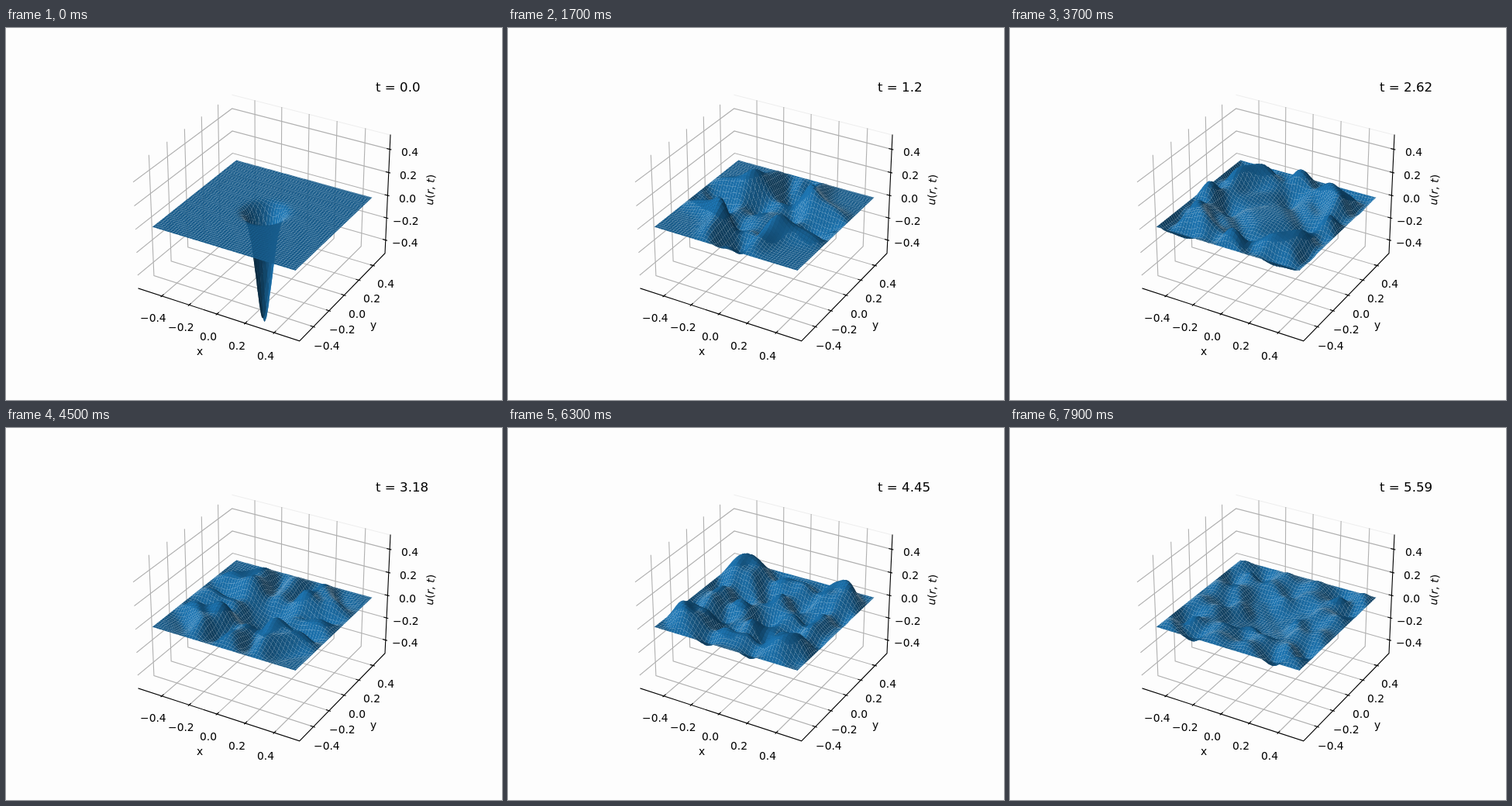
An HTML page with a canvas for the animation above (8000 ms loop, 640x480 px).

```html
<!DOCTYPE html>
<html lang="en">
<head>
<meta charset="utf-8">
<title>Wave on a square membrane</title>
<style>
html, body { margin: 0; width: 640px; height: 480px; overflow: hidden; background: #fdfdfd; }
svg, canvas { position: absolute; left: 0; top: 0; display: block; }
text { font-family: "DejaVu Sans", sans-serif; font-size: 13.89px; fill: #000; }
.mid { text-anchor: middle; }
.grid { fill: none; stroke: #b0b0b0; stroke-width: 1.11; stroke-linecap: square; }
.axis { fill: none; stroke: #000; stroke-width: 1.11; stroke-linecap: square; }
.pane { fill: none; stroke: #eee; stroke-width: 1; }
</style>
</head>
<body>
<svg id="axes" width="640" height="480" viewBox="0 0 640 480">
  <g id="frame"></g>
  <text class="mid" x="250" y="422">x</text>
  <text class="mid" x="474" y="388">y</text>
  <text class="mid" transform="translate(552 209) rotate(-87.4)"><tspan font-style="oblique">u</tspan>(<tspan font-style="oblique">r</tspan>, <tspan font-style="oblique">t</tspan>)</text>
  <text id="clock" x="477" y="82" style="font-size:16.67px"></text>
</svg>
<canvas id="surface" width="640" height="480"></canvas>
<script>
const start = performance.now();
const FRAMES = 80, FRAME_MS = 100, STEPS = 10;
const N = 100, STRIDE = 2, DX = 1 / (N - 1), COURANT = 0.7, DT = COURANT * DX;

// Perspective camera: elevation 30°, azimuth -60°, distance 10
const SX = 8 / 7 / 1.1, SZ = 6 / 7;
const C = Math.sqrt(3) / 2;
function project(x, y, z) {
  const depth = 10 - (C / 2 * x - 0.75 * y + 0.5 * z);
  const k = 369.6 / 0.185 / depth;
  return [333 + k * (C * x + 0.5 * y), 237.4 - k * (-0.25 * x + C / 2 * y + C * z), depth];
}

// Axes box
const M = 25 / 42, MZ = 25 / 56, PAD = 0.0988, OUT = 0.0095, IN = 0.019;
const frame = document.getElementById("frame");
function add(tag, attrs, content = "") {
  const el = document.createElementNS("http://www.w3.org/2000/svg", tag);
  for (const key in attrs) el.setAttribute(key, attrs[key]);
  el.textContent = content;
  frame.append(el);
  return el;
}
function line(cls, ...points) {
  const coords = points.map(p => project(...p).slice(0, 2).map(v => v.toFixed(2)).join());
  add("polyline", { class: cls, points: coords.join(" ") });
}
// Labels are centred, then set on whole pixels
function label(value, pos, dy) {
  const [x, y] = project(...pos);
  const el = add("text", { y: Math.round(y + dy) }, value.toFixed(1).replace("-", "\u2212"));
  el.setAttribute("x", Math.floor(x - el.getComputedTextLength() / 2));
}
function drawAxes() {
  const ticks = [-0.4, -0.2, 0, 0.2, 0.4];
  line("pane", [-M, M, MZ], [M, M, MZ]);
  for (const t of ticks) {
    const s = t * SX, h = t * SZ;
    line("grid", [s, -M, -MZ], [s, M, -MZ], [s, M, MZ]);
    line("grid", [M, s, -MZ], [-M, s, -MZ], [-M, s, MZ]);
    line("grid", [-M, -M, h], [-M, M, h], [M, M, h]);
  }
  line("axis", [-M, -M, -MZ], [M, -M, -MZ], [M, M, -MZ], [M, M, MZ]);
  for (const t of ticks) {
    const s = t * SX, h = t * SZ;
    line("axis", [s, -M - OUT, -MZ], [s, -M + IN, -MZ]);
    line("axis", [M + OUT, s, -MZ], [M - IN, s, -MZ]);
    line("axis", [M + OUT, M, h], [M - IN, M, h]);
    label(t, [s, -M - PAD, -MZ - PAD], 7.3);
    label(t, [M + PAD, s, -MZ - PAD], 7.3);
    label(t, [M + PAD, M + PAD, h], 12);
  }
}

// Wave equation with fixed edges, released from rest as a Gaussian dip
const coord = i => -0.5 + i * DX;
function simulate() {
  let now = new Float64Array(N * N), next = new Float64Array(N * N), prev;
  const inner = visit => {
    for (let j = 1; j < N - 1; j++)
      for (let i = 1; i < N - 1; i++) visit(j * N + i, i, j);
  };
  const bend = (u, k) => COURANT ** 2 * (u[k - 1] + u[k + 1] + u[k - N] + u[k + N] - 4 * u[k]);
  inner((k, i, j) => { now[k] = -Math.exp(-200 * (coord(i) ** 2 + coord(j) ** 2)); });
  prev = now.slice();
  inner(k => { prev[k] = now[k] + 0.5 * bend(now, k); });
  const shots = [now.slice()];
  while (shots.length < FRAMES) {
    for (let s = 0; s < STEPS; s++) {
      inner(k => { next[k] = 2 * now[k] - prev[k] + bend(now, k); });
      [prev, now, next] = [now, next, prev];
    }
    shots.push(now.slice());
  }
  return shots;
}

// Each patch is the outline of a block of grid cells
function makePatches() {
  const cuts = [];
  for (let i = 0; i < N - 1; i += STRIDE) cuts.push(i);
  cuts.push(N - 1);
  const patches = [];
  for (let b = 0; b + 1 < cuts.length; b++)
    for (let a = 0; a + 1 < cuts.length; a++) {
      const [x0, x1, y0, y1] = [cuts[a], cuts[a + 1], cuts[b], cuts[b + 1]];
      const ring = [];
      for (let i = x0; i < x1; i++) ring.push(y0 * N + i);
      for (let j = y0; j < y1; j++) ring.push(j * N + x1);
      for (let i = x1; i > x0; i--) ring.push(y1 * N + i);
      for (let j = y1; j > y0; j--) ring.push(j * N + x0);
      patches.push(ring);
    }
  return patches;
}

function shade(ring, u) {
  const n = ring.length;
  const [p, q, r] = [0, Math.floor(n / 3), Math.floor(2 * n / 3)].map(i => {
    const k = ring[i];
    return [coord(k % N), coord(Math.floor(k / N)), u[k]];
  });
  const a = p.map((v, i) => v - q[i]), b = q.map((v, i) => v - r[i]);
  const nx = a[1] * b[2] - a[2] * b[1];
  const ny = a[2] * b[0] - a[0] * b[2];
  const nz = a[0] * b[1] - a[1] * b[0];
  const lit = (-2 * nx - 2 * ny + nz) / 3 / Math.hypot(nx, ny, nz);
  const level = 0.65 + 0.35 * lit;
  return `rgb(${[31, 119, 180].map(c => Math.round(c * level)).join()})`;
}

const shots = simulate(), patches = makePatches();
const ctx = document.getElementById("surface").getContext("2d");
const clock = document.getElementById("clock");

function drawSurface(u) {
  const points = Array.from(u, (z, k) =>
    project(coord(k % N) * SX, coord(Math.floor(k / N)) * SX, z * SZ));
  const order = patches.map(ring => ({
    ring,
    depth: ring.reduce((sum, k) => sum + points[k][2], 0) / ring.length
  })).sort((a, b) => b.depth - a.depth);
  ctx.clearRect(0, 0, 640, 480);
  for (const { ring } of order) {
    ctx.beginPath();
    for (const k of ring) ctx.lineTo(points[k][0], points[k][1]);
    ctx.closePath();
    ctx.fillStyle = shade(ring, u);
    ctx.fill();
  }
}

function timeText(index) {
  const t = Number((index * STEPS * DT).toFixed(2));
  return "t = " + (Number.isInteger(t) ? t.toFixed(1) : t);
}

let shown = -1;
function tick() {
  const index = Math.floor((performance.now() - start) / FRAME_MS) % FRAMES;
  if (index !== shown) {
    shown = index;
    drawSurface(shots[index]);
    clock.textContent = timeText(index);
  }
  requestAnimationFrame(tick);
}

drawAxes();
tick();
</script>
</body>
</html>
```
